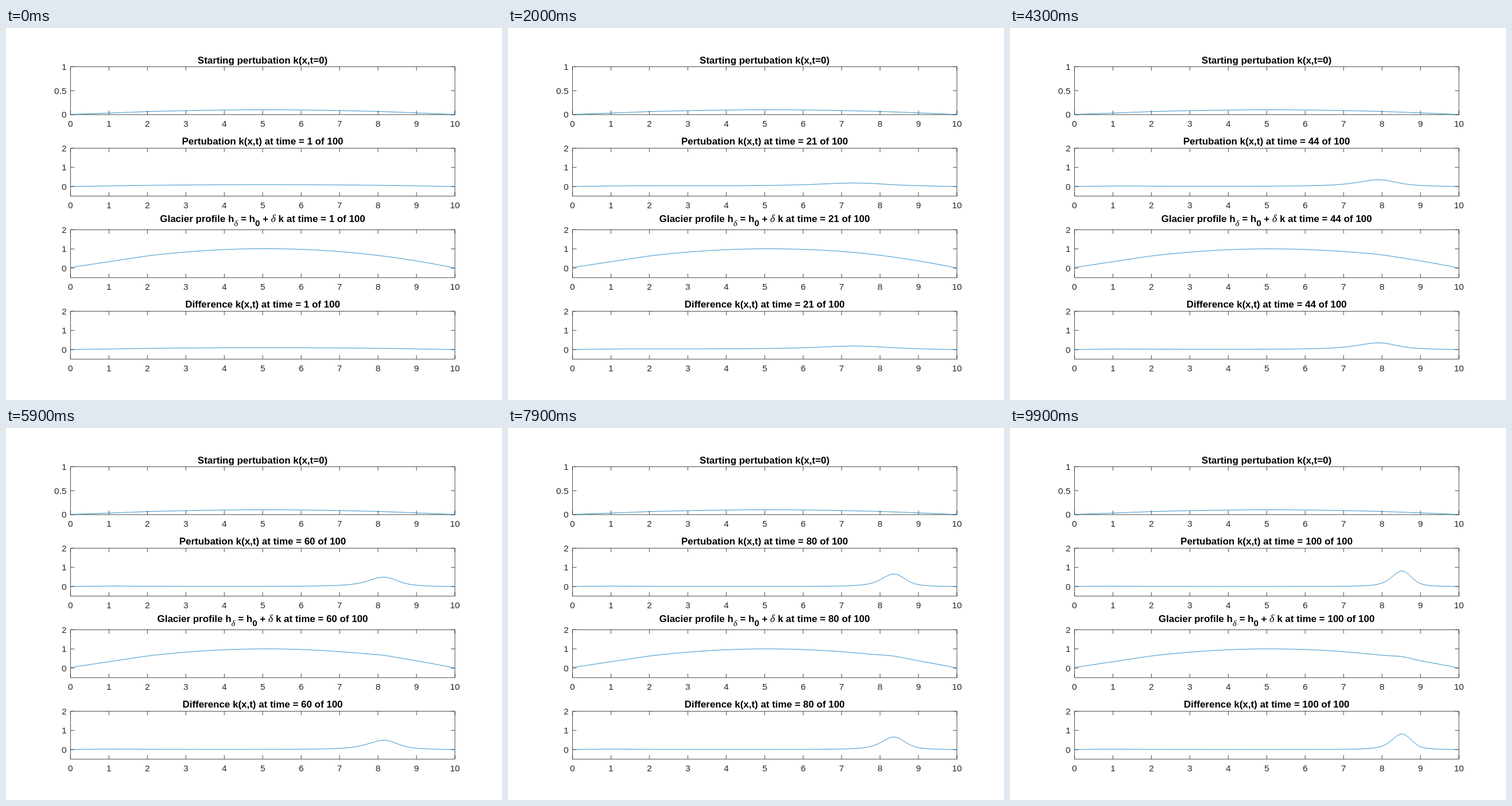
Recreate the animation shown at these times as an HTML page. Size 864 by 648 pixels, loop 10 s.

```html
<!DOCTYPE html>
<html lang="en">
<head>
<meta charset="utf-8">
<style>
  html, body { margin: 0; width: 100%; height: 100%; overflow: hidden; background: #fff; }
  svg { display: block; width: 864px; height: 648px; }
  text { font: 15.4px "Liberation Sans", sans-serif; fill: #262626; }
  .title { font-size: 16.95px; font-weight: bold; fill: #000; text-anchor: middle; }
  .greek { font: italic 18px "Liberation Serif", serif; }
  .sub { font-size: 15px; }
  .axes { fill: none; stroke: #262626; stroke-width: 0.85; }
  .curve { fill: none; stroke: #0072bd; stroke-width: 0.8; stroke-linejoin: round; }
</style>
</head>
<body>
<svg id="stage" viewBox="0 0 864 648"></svg>
<script>
const LEFT = 112.4, WIDTH = 669.6, HEIGHT = 83.5;
const STEPS = 100, CELLS = 100, DX = 10 / CELLS, DELTA = 0.1;
const stage = document.getElementById('stage');

function add(tag, attrs, content = '') {
  const node = document.createElementNS('http://www.w3.org/2000/svg', tag);
  for (const name in attrs) node.setAttribute(name, attrs[name]);
  node.innerHTML = content;
  return stage.appendChild(node);
}

const xOf = x => LEFT + x * WIDTH / 10;

function makePanel(row, min, max, ticks, titleY) {
  const top = 67.4 + row * 142, bottom = top + HEIGHT;
  const yOf = v => bottom - (v - min) / (max - min) * HEIGHT;
  let path = `M${LEFT} ${top}h${WIDTH}v${HEIGHT}h${-WIDTH}Z`;
  for (let i = 0; i <= 10; i++) {
    path += `M${xOf(i)} ${bottom}v-7M${xOf(i)} ${top}v7`;
    add('text', { x: xOf(i), y: bottom + 20.7, 'text-anchor': 'middle' }, i);
  }
  for (const v of ticks) {
    path += `M${LEFT} ${yOf(v)}h7M${LEFT + WIDTH} ${yOf(v)}h-7`;
    add('text', { x: 105.5, y: yOf(v) + 5.5, 'text-anchor': 'end' }, v);
  }
  add('path', { d: path, class: 'axes' });
  const curve = add('path', { class: 'curve' });
  const title = add('text', { x: 447, y: titleY, class: 'title' });
  return {
    plot(values) {
      curve.setAttribute('d', 'M' + values.map((v, i) =>
        xOf(i * DX).toFixed(2) + ' ' + yOf(v).toFixed(2)).join('L'));
    },
    label(html) { title.innerHTML = html; }
  };
}

// Undisturbed ice thickness: a slightly skewed parabola with a straight flank.
function thickness(x) {
  const u = x / 5 - 1;
  return x < 2 ? 0.03 + 0.3 * x : (1 - u * u) * (1 + 0.03 * u);
}

// Kinematic wave k_t + (c k)_x = 0 with c ~ h^4, first-order upwind.
function simulate() {
  const SPEED = 0.0945, SUB = 12;
  const h = Array.from({ length: CELLS + 1 }, (_, i) => thickness(i * DX));
  const courant = h.map(v => SPEED * v ** 4 / DX / SUB);
  let k = h.map(v => 0.1 * v);
  const history = [k];
  while (history.length < STEPS) {
    for (let n = 0; n < SUB; n++) {
      k = k.map((v, i) => i ? v - courant[i] * v + courant[i - 1] * k[i - 1] : v);
    }
    history.push(k);
  }
  return history;
}

const base = Array.from({ length: CELLS + 1 }, (_, i) => thickness(i * DX));
const history = simulate();
const start = makePanel(0, 0, 1, [0, 0.5, 1], 61.5);
const [wave, glacier, difference] = [203, 337.5, 487.3].map(
  (titleY, i) => makePanel(i + 1, -0.5, 2, [0, 1, 2], titleY));

start.plot(history[0]);
start.label('Starting pertubation k(x,t=0)');

function render(ms) {
  const step = Math.floor(ms / 100) % STEPS, k = history[step];
  const when = `at time = ${step + 1} of ${STEPS}`;
  wave.plot(k);
  wave.label(`Pertubation k(x,t) ${when}`);
  glacier.plot(k.map((v, i) => base[i] + DELTA * v));
  glacier.label('Glacier profile h<tspan class="greek sub" dy="7.5">δ</tspan><tspan dy="-7.5"> = h</tspan>' +
    '<tspan class="sub" dy="7.5">0</tspan><tspan dy="-7.5"> + </tspan>' +
    `<tspan class="greek">δ</tspan> k ${when}`);
  difference.plot(k);
  difference.label(`Difference k(x,t) ${when}`);
}

const origin = performance.now();
function tick() {
  render(performance.now() - origin);
  requestAnimationFrame(tick);
}
tick();
</script>
</body>
</html>
```
